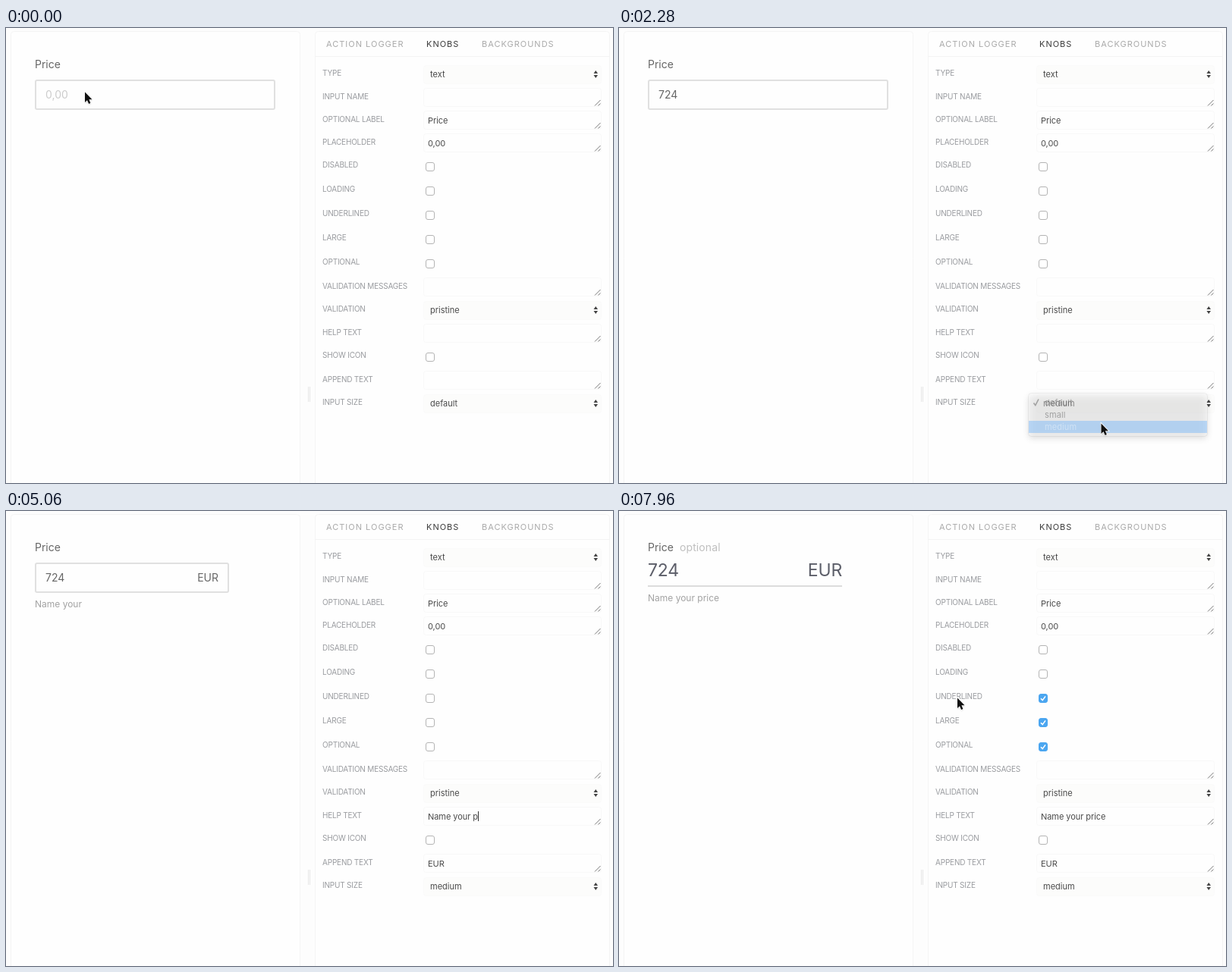
An HTML page with a canvas that plays this animation: 800x600 px, repeating every 8 s.

```html
<!DOCTYPE html>
<html lang="en">
<head>
<meta charset="utf-8">
<title>Price input knobs</title>
<style>
  html, body { margin: 0; width: 100%; height: 100%; overflow: hidden; background: #fdfdfd; }
  canvas { display: block; }
</style>
</head>
<body>
<canvas id="stage" width="800" height="600"></canvas>
<script>
const ctx = document.getElementById('stage').getContext('2d');
const LOOP = 8000, BLINK = 140, PREVIEW_LAG = 20;

// [kind, label, vertical centre]
const rows = [
  ['select', 'TYPE', 60], ['text', 'INPUT NAME', 91], ['text', 'OPTIONAL LABEL', 121],
  ['text', 'PLACEHOLDER', 151], ['check', 'DISABLED', 181], ['check', 'LOADING', 213],
  ['check', 'UNDERLINED', 245], ['check', 'LARGE', 277], ['check', 'OPTIONAL', 309],
  ['text', 'VALIDATION MESSAGES', 341], ['select', 'VALIDATION', 371], ['text', 'HELP TEXT', 402],
  ['check', 'SHOW ICON', 432], ['text', 'APPEND TEXT', 464], ['select', 'INPUT SIZE', 494],
];

// Typed fields: focus span and the time of each key
const typed = {
  amount: { text: '724', from: 840, to: 1840, keys: [1040, 1220, 1260] },
  append: { text: 'EUR', from: 2660, to: 3740, keys: [3000, 3140, 3280] },
  help: {
    text: 'Name your price', from: 3760, to: 6240,
    keys: [4080, 4160, 4260, 4340, 4600, 4620, 4760, 4840, 4900, 4980, 5060, 5140, 5220, 5320, 5400],
  },
};

// Pointer path: [time, x, y]
const path = [
  [0, 103.5, 84], [740, 103.5, 84], [780, 104.5, 89], [1560, 104.5, 89], [1820, 628, 492],
  [1900, 628, 492], [2040, 635, 521], [2520, 635, 521], [2640, 606.5, 464], [3560, 606.5, 464],
  [3720, 597.5, 402], [5960, 597.5, 402], [6220, 441, 311], [6680, 441, 311],
  [6800, 439.5, 276], [7080, 439.5, 276], [7200, 445.5, 246], [LOOP, 445.5, 246],
];
const hidden = [[1080, 1560], [2980, 3560], [4080, 5960]];
const beam = [[760, 1620], [2600, 6060]];

const clamp = v => Math.max(0, Math.min(1, v));
const ramp = (t, a, b) => clamp((t - a) / (b - a));
const within = (t, spans) => spans.some(([a, b]) => t >= a && t < b);

function pointerAt(t) {
  const i = Math.max(1, path.findIndex(p => p[0] > t));
  const [a, b] = [path[i - 1], path[i]];
  const k = ramp(t, a[0], b[0]), e = k * k * (3 - 2 * k);
  return [a[1] + (b[1] - a[1]) * e, a[2] + (b[2] - a[2]) * e];
}

const valueAt = (f, t) => f.text.slice(0, f.keys.filter(k => k <= t).length);

function caretOn(f, t) {
  if (t < f.from || t >= f.to) return false;
  const last = Math.max(f.from, ...f.keys.filter(k => k <= t));
  return Math.floor((t - last) / BLINK) % 2 === 0;
}

function text(str, x, cy, size, color, { spacing = 0, align = 'left' } = {}) {
  ctx.font = `${size}px Inter, sans-serif`;
  ctx.letterSpacing = spacing + 'px';
  ctx.textAlign = align;
  ctx.fillStyle = color;
  ctx.fillText(str, x, Math.round(cy + size * 0.36 - 0.3));
  return ctx.measureText(str).width;
}

function rect(x, y, w, h, color) {
  ctx.fillStyle = color;
  ctx.fillRect(x, y, w, h);
}

function box(x, y, w, h, r, fill, stroke, line = 1) {
  ctx.beginPath();
  ctx.roundRect(x, y, w, h, r);
  if (fill) { ctx.fillStyle = fill; ctx.fill(); }
  if (stroke) { ctx.strokeStyle = stroke; ctx.lineWidth = line; ctx.stroke(); }
}

function lines(color, width, ...polylines) {
  ctx.beginPath();
  for (const [x, y, ...rest] of polylines) {
    ctx.moveTo(x, y);
    for (let i = 0; i < rest.length; i += 2) ctx.lineTo(rest[i], rest[i + 1]);
  }
  ctx.strokeStyle = color;
  ctx.lineWidth = width;
  ctx.stroke();
}

function polygon(points, color) {
  ctx.beginPath();
  for (let i = 0; i < points.length; i += 2) ctx.lineTo(points[i], points[i + 1]);
  ctx.closePath();
  ctx.fillStyle = color;
  ctx.fill();
}

function drawFrame() {
  rect(0, 0, 800, 600, '#fdfdfd');
  box(6.5, 4.5, 381, 620, 4, '#fefefe', '#f4f4f4');
  box(407.5, 4.5, 388, 620, 4, '#fefefe', '#f4f4f4');
  rect(408, 37, 387, 1, '#f3f3f3');
  rect(398, 473, 1, 20, '#e6e6e6');
  rect(400, 473, 1, 20, '#e6e6e6');
  text('ACTION LOGGER', 422, 21, 11, '#aaa', { spacing: 1 });
  text('KNOBS', 554, 21, 11, '#3c3c3c', { spacing: 1 });
  text('BACKGROUNDS', 627, 21, 11, '#aaa', { spacing: 1 });
}

function drawKnobs(t) {
  const values = {
    'TYPE': 'text', 'OPTIONAL LABEL': 'Price', 'PLACEHOLDER': '0,00', 'VALIDATION': 'pristine',
    'HELP TEXT': valueAt(typed.help, t), 'APPEND TEXT': valueAt(typed.append, t),
    'INPUT SIZE': t < 2220 ? 'default' : 'medium',
    'OPTIONAL': t >= 6260, 'LARGE': t >= 6860, 'UNDERLINED': t >= 7400,
  };
  const fields = { 'HELP TEXT': typed.help, 'APPEND TEXT': typed.append };
  for (const [kind, label, y] of rows) {
    const value = values[label] || '';
    text(label, 417, y, 10, '#999b9f', { spacing: -0.2 });
    if (kind === 'check') {
      box(553.5, y - 3.5, 11, 11, 2.5, value ? '#4ba6f0' : '#fff', value ? '#4ba6f0' : '#b4b4b4');
      if (value) lines('#fff', 1.6, [556, y + 2.2, 558.2, y + 4.6, 562, y - 0.6]);
    } else if (kind === 'select') {
      box(550.5, y - 10.5, 234, 24, 3, '#fcfcfb', '#fafafa');
      text(value, 559, y + 1, 11, '#4a4a4a');
      polygon([774.5, y, 777.2, y - 4, 780, y], '#444');
      polygon([774.5, y + 2, 777.2, y + 6, 780, y + 2], '#444');
    } else {
      box(550.5, y - 11.5, 234, 24, 3, '#fefefe', '#f8f8f8');
      lines('#777', 1, [776, y + 11.5, 783.5, y + 4], [780.5, y + 11.5, 783.5, y + 8.5]);
      const w = text(value, 556, y + 1, 11, '#4a4a4a', { spacing: -0.06 });
      const field = fields[label];
      if (field && caretOn(field, t)) rect(Math.round(556 + w), y - 6, 1, 13, '#333');
    }
  }
}

function drawPreview(t) {
  const large = t >= 6860, underlined = t >= 7400;
  const right = t < 2320 ? 355 : 294;
  const bottom = underlined ? 100 : large ? 116 : 108;
  const pad = underlined ? 0 : 14;
  const cy = underlined ? 78 : large ? 92.5 : 88;
  const size = large ? 23 : 14;
  const ink = large ? '#5c5e69' : '#666';
  const style = { spacing: large ? -0.2 : 0 };

  text('Price', 38, 48, 14, '#666');
  if (t >= 6280) text('optional', 80, 48, 14, '#bfbfbf', { spacing: 0.1 });

  const blue = ramp(t, 740, 880) * (1 - ramp(t, 1840, 1960));
  const mix = (a, b) => Math.round(a + (b - a) * blue);
  const border = `rgb(${mix(224, 52)},${mix(224, 157)},${mix(224, 217)})`;
  ctx.globalAlpha = 1 - ramp(t, 7400, 7480);
  box(39, 69, right - 40, bottom - 70, 2, null, border, 2);
  ctx.globalAlpha = 1;
  if (underlined) rect(38, 98, right - 38, 2, '#dcdcdc');

  const amount = valueAt(typed.amount, t);
  const w = text(amount, 38 + pad, cy, size, ink, style);
  if (!amount) text('0,00', 52, cy, 14, '#ccc');
  if (caretOn(typed.amount, t)) rect(Math.round(52 + w), 80, 1, 16, '#444');
  text(valueAt(typed.append, t), right - pad, cy, size, ink, { ...style, align: 'right' });
  text(valueAt(typed.help, t - PREVIEW_LAG), 38, bottom + 14.5, 12, '#a2a2a2');
}

function drawMenu(t, pointerY) {
  if (t < 1860 || t >= 2320) return;
  ctx.save();
  ctx.globalAlpha = 1 - ramp(t, 2220, 2320);
  ctx.shadowColor = 'rgba(0,0,0,.35)';
  ctx.shadowBlur = 9;
  ctx.shadowOffsetY = 3;
  box(540, 482, 235, 56, 4, '#f6f6f6');
  ctx.shadowColor = 'transparent';
  box(539.5, 481.5, 236, 57, 4, null, 'rgba(0,0,0,.12)');
  const blinkOff = t >= 2140 && t < 2180;
  const active = blinkOff ? -1 : Math.max(0, Math.floor((pointerY - 486) / 16));
  ['default', 'small', 'medium'].forEach((item, i) => {
    const y = 494 + i * 16, on = i === active, color = on ? '#fff' : '#333';
    if (on) rect(540, y - 8, 235, 16, '#60aefc');
    text(item, 561, y, 11, color, { spacing: 0.1 });
    if (i === 0) lines(color, 1.6, [546.5, 494.5, 548.8, 497.5, 553, 489.5]);
  });
  ctx.restore();
}

function drawPointer(t, x, y) {
  if (within(t, hidden)) return;
  ctx.save();
  ctx.translate(x, y);
  if (within(t, beam)) {
    const shape = [[-3, -7, -1, -7, 0, -6, 0, 6, -1, 7, -3, 7], [3, -7, 1, -7, 0, -6], [3, 7, 1, 7, 0, 6], [-2, 1, 2, 1]];
    lines('#fff', 2.6, ...shape);
    lines('#222', 1.2, ...shape);
  } else {
    const shape = [0.5, 0.5, 0.5, 14, 3.5, 11.2, 5.6, 16, 7.9, 15, 5.9, 10.3, 10, 10.3];
    ctx.shadowColor = 'rgba(0,0,0,.35)';
    ctx.shadowBlur = 2;
    ctx.shadowOffsetY = 1;
    polygon(shape, '#111');
    ctx.shadowColor = 'transparent';
    ctx.strokeStyle = '#fff';
    ctx.lineWidth = 1.6;
    ctx.stroke();
    polygon(shape, '#111');
  }
  ctx.restore();
}

function render(now) {
  const t = now % LOOP;
  const [x, y] = pointerAt(t);
  drawFrame();
  drawKnobs(t);
  drawPreview(t);
  drawMenu(t, y);
  drawPointer(t, x, y);
}

const start = performance.now();
function tick() {
  render(performance.now() - start);
  requestAnimationFrame(tick);
}
tick();
</script>
</body>
</html>
```
